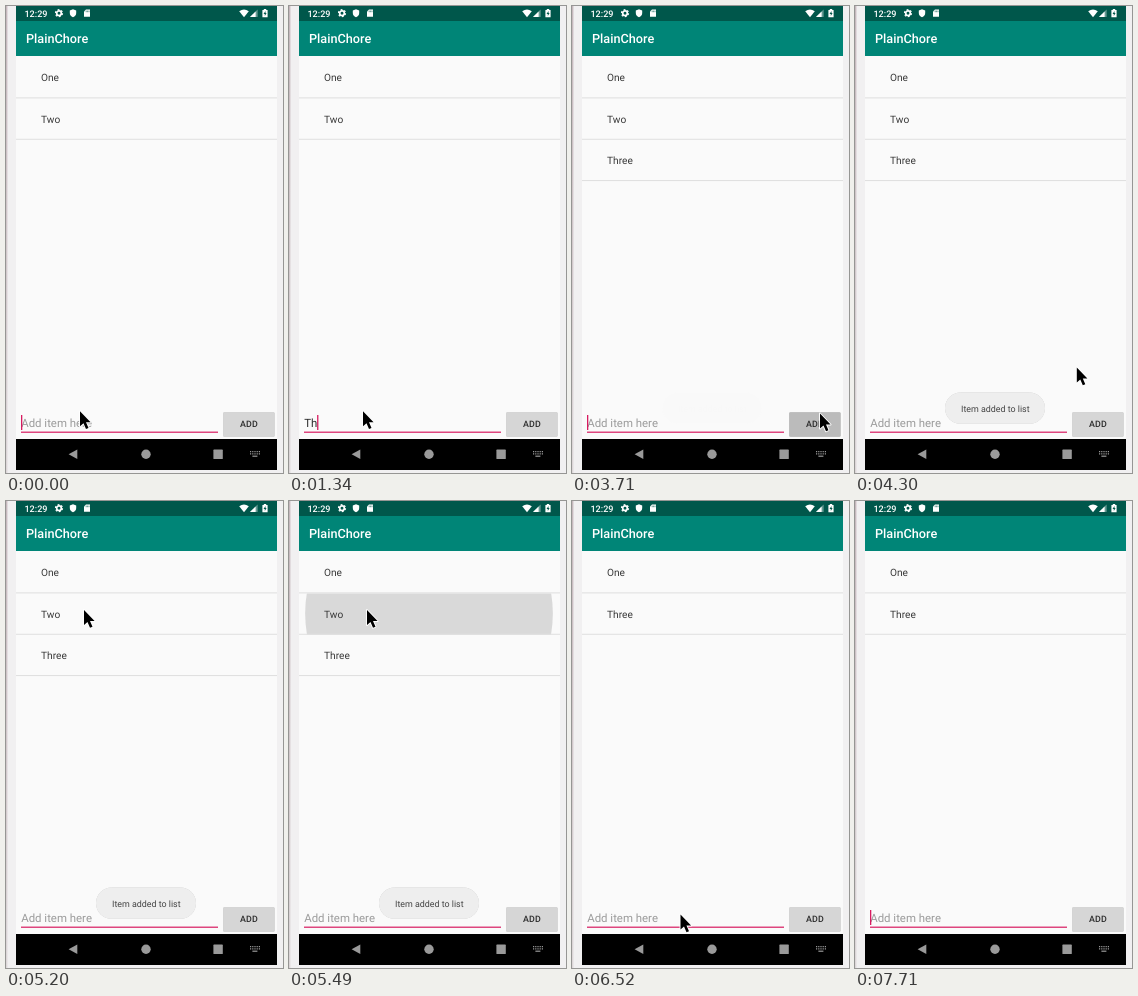
An HTML page for the animation above (8 s loop, 277 px wide and 467 px high).

```html
<!DOCTYPE html>
<html lang="en">
<head>
<meta charset="utf-8">
<title>To-do list</title>
<style>
  html, body { margin: 0; width: 100%; height: 100%; overflow: hidden; background: #f1f0f1; }
  svg { display: block; width: 277px; height: 467px; font-family: Roboto, Arial, sans-serif; }
  text { text-rendering: geometricPrecision; }
  .item { font-size: 10.16px; fill: #383838; }
  .field { font-size: 11.43px; }
  .line { fill: #dedede; }
  .soft { filter: drop-shadow(0 .5px .6px rgba(0, 0, 0, .22)); }
</style>
</head>
<body>
<svg viewBox="0 0 277 467">
  <linearGradient id="edge" x2="0" y2="1">
    <stop stop-color="#c6b8bd"/>
    <stop offset="1" stop-color="#ddd7d9"/>
  </linearGradient>
  <rect width="277" height="467" fill="#f1f0f1"/>
  <rect width="1.4" height="467" fill="url(#edge)"/>
  <rect x="10" width="261" height="464" fill="#fafafa"/>

  <clipPath id="row"><rect x="10" y="92.5" width="261" height="41"/></clipPath>
  <circle id="ripple" cx="140" cy="112.5" fill="#d9d9d9" clip-path="url(#row)"/>
  <g id="list"></g>

  <!-- status and app bars -->
  <rect x="10" y="14" width="261" height="36" fill="#008577"/>
  <rect x="10" width="261" height="15" fill="#00574b"/>
  <g fill="#fff">
    <text x="18.4" y="10.5" font-size="9.1" font-weight="500">12:29</text>
    <circle cx="53" cy="7.2" r="2.3" fill="none" stroke="#fff" stroke-width="1.7"/>
    <circle cx="53" cy="7.2" r="3.5" fill="none" stroke="#fff" stroke-width="1.2" stroke-dasharray="1.83 1.83"/>
    <path d="M67 3.2L70.2 4.5V7Q70.2 10 67 11.3Q63.8 10 63.8 7V4.5Z"/>
    <path d="M80 3.5H84V10.8H78V5.5Z"/>
    <path d="M80.2 4.6V6.2M81.6 4.6V6.2M83 4.6V6.2" stroke="#00574b" stroke-width=".6"/>
    <path d="M233.2 5.2Q238 1.6 242.8 5.2L238 11.2Z"/>
    <path d="M251.6 3.4V11H244Z" opacity=".4"/>
    <path d="M249.6 5.4V11H244Z"/>
    <path d="M257.8 3H260.2V3.9H261.6V11.2H256.4V3.9H257.8Z"/>
    <path d="M259.5 5L257.5 7.9H258.8V10L260.6 7.1H259.5Z" fill="#00574b"/>
    <text x="20" y="37.3" font-size="12.7" font-weight="500">PlainChore</text>
  </g>

  <!-- entry field and button -->
  <text id="hint" class="field" x="15.2" y="421" fill="#9b9b9b">Add item here</text>
  <text id="typed" class="field" x="15.2" y="421" fill="#2b2b2b"></text>
  <rect id="caret" y="409" width="1.3" height="15" fill="#d81b60"/>
  <rect x="15" y="425.6" width="197" height="1.2" fill="#d81b60"/>
  <rect id="button" class="soft" x="217.2" y="406.2" width="51.4" height="24.6" rx="1.3"/>
  <text x="243" y="421.1" font-size="8.9" font-weight="500" letter-spacing=".1" text-anchor="middle" fill="#2b2b2b">ADD</text>

  <g id="toast">
    <rect class="soft" x="90" y="386.5" width="100" height="31.3" rx="15.6" fill="#eee"/>
    <text x="140.3" y="405.6" font-size="8.9" text-anchor="middle" fill="#444">Item added to list</text>
  </g>

  <!-- navigation bar -->
  <rect x="10" y="433" width="261" height="31" fill="#000"/>
  <g fill="#9a9a9a">
    <path d="M62.6 448.2L71.3 443.4V453Z"/>
    <circle cx="140" cy="448.2" r="4.7"/>
    <rect x="207.4" y="443.6" width="9.4" height="9.4" rx=".6"/>
    <path d="M244 445.7H254M244 447.9H254" stroke="#9a9a9a" stroke-width="1.2" stroke-dasharray="1.2 1"/>
    <rect x="246.4" y="449.6" width="5" height="1.2"/>
  </g>

  <path id="mouse" d="M0 0V15L3.5 11.9L6 17.8L8.5 16.7L6 11H10.6Z"
    stroke="#fff" stroke-width="1.8" stroke-linejoin="round" paint-order="stroke"/>
</svg>

<script>
const LOOP = 8000;
const STEP = LOOP / 54;   // the screen refreshes in even steps
const BLINK = 500;
const WORD = 'Three';
const KEYS = [880, 1330, 1780, 2520, 2660];
const ADD = 3680, PRESS = 5400, REMOVE = 5920, LEAVE = 6600;

// Pointer trips: start, end, destination
const HOME = [74, 405.3];
const TRIPS = [
  [2850, 3420, [248, 407.5]],
  [4070, 4740, [78, 109]],
  [5980, 6515, [108.5, 413.5]]
];

const el = id => document.getElementById(id);
const [list, ripple, hint, typed, caret, button, toast, mouse] =
  ['list', 'ripple', 'hint', 'typed', 'caret', 'button', 'toast', 'mouse'].map(el);

const clamp = x => Math.min(1, Math.max(0, x));
const ease = p => p < .5 ? 4 * p ** 3 : 1 - 4 * (1 - p) ** 3;

function pointer(t) {
  return TRIPS.reduce((from, [start, end, to]) => {
    const p = ease(clamp((t - start) / (end - start)));
    return from.map((v, i) => v + (to[i] - v) * p);
  }, HOME);
}

// The caret restarts its blink at every edit.
function caretOn(t) {
  const last = [-420, ...KEYS, ADD].findLast(edit => edit <= t);
  return Math.floor((t - last) / BLINK) % 2 === 0;
}

let shown = '';
function drawList(names) {
  if (String(names) === shown) return;
  shown = String(names);
  list.innerHTML = names.map((name, i) => {
    const y = 50.4 + i * 41.35;
    return `<text class="item" x="35" y="${y + 24.9}">${name}</text>` +
      `<rect class="line" x="10" y="${y + 41}" width="261" height="1"/>`;
  }).join('');
}

function draw(time) {
  const t = Math.floor((time + 8) / STEP) * STEP;
  const text = t < ADD ? WORD.slice(0, KEYS.filter(key => key <= t).length) : '';
  const names = ['One'];
  if (t < REMOVE) names.push('Two');
  if (t >= ADD) names.push(WORD);
  drawList(names);

  typed.textContent = text;
  hint.style.opacity = text ? 0 : 1;
  caret.setAttribute('x', 15 + (text && typed.getComputedTextLength()));
  caret.style.opacity = caretOn(t) ? 1 : 0;

  const grey = 214 - 30 * clamp(1 - Math.abs(t - ADD) / 250);
  button.setAttribute('fill', `rgb(${grey},${grey},${grey})`);
  toast.style.opacity = Math.min(clamp((t - ADD - 20) / 400), clamp((6240 - t) / 400));
  ripple.setAttribute('r', t < REMOVE ? Math.max(0, Math.min(140, (t - PRESS) * 1.52)) : 0);

  mouse.style.opacity = t < LEAVE ? 1 : 0;
  mouse.setAttribute('transform', `translate(${pointer(t)})`);
}

const start = performance.now();
function tick() {
  draw((performance.now() - start) % LOOP);
  requestAnimationFrame(tick);
}
tick();
</script>
</body>
</html>
```
